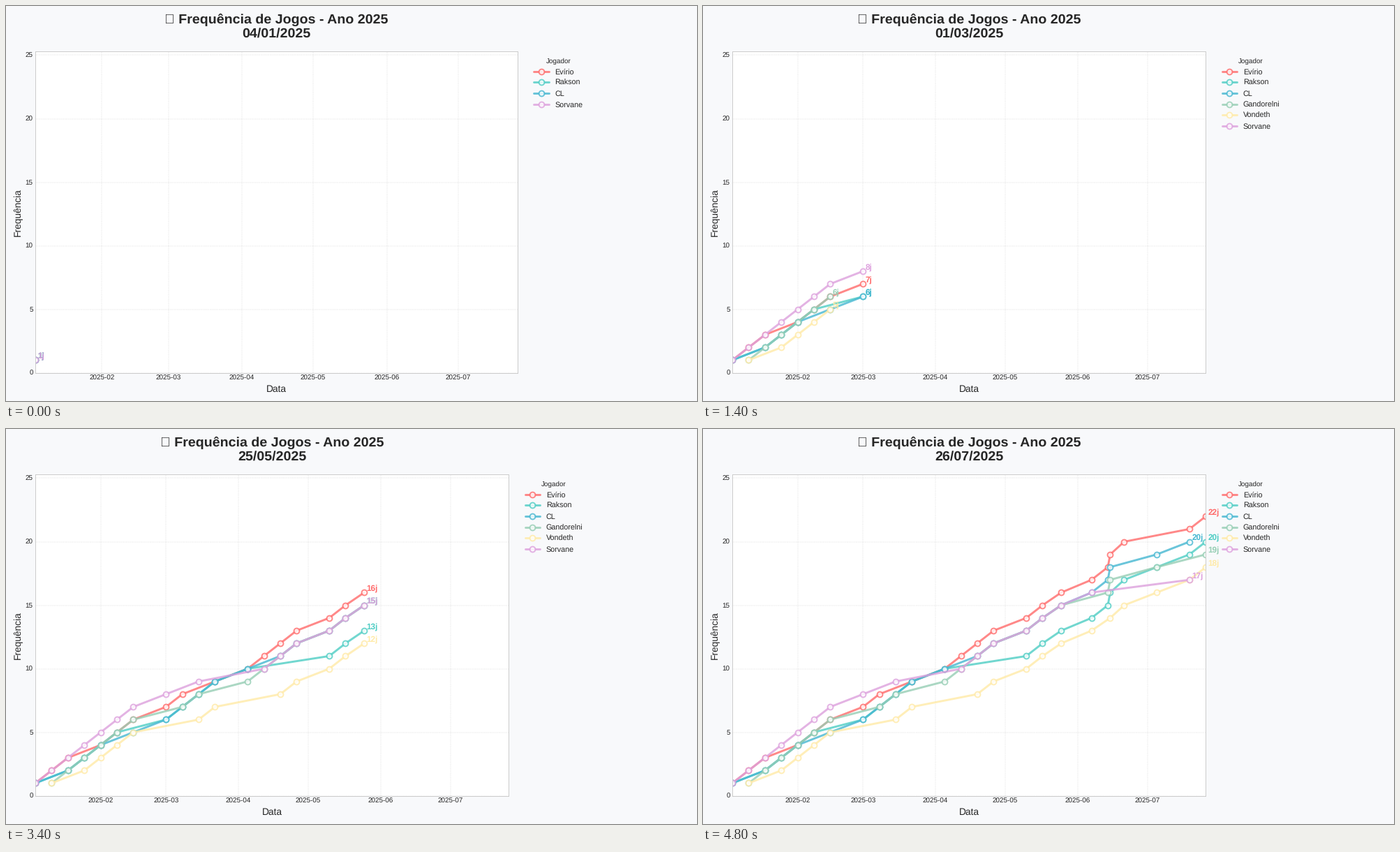
A matplotlib script for the animation above (5 s loop, 990 px wide and 566 px high).

```python
import matplotlib.pyplot as plt
import matplotlib.dates as mdates
import numpy as np
from matplotlib.animation import FuncAnimation

plt.style.use("seaborn-v0_8-whitegrid")
plt.rcParams.update({"font.family": "Liberation Sans", "text.hinting": "none"})

# Match days of 2025, grouped by month
SCHEDULE = {
    1: (4, 11, 18, 25),
    2: (1, 8, 15),
    3: (1, 8, 15, 22),
    4: (5, 12, 19, 26),
    5: (10, 17, 25),
    6: (7, 14, 15, 21),
    7: (5, 19, 26),
}
DATES = [np.datetime64(f"2025-{month:02d}-{day:02d}")
         for month, days in SCHEDULE.items() for day in days]
X = mdates.date2num(DATES)

# name, colour, indices of the match days the player missed
PLAYERS = [
    ("Evírio", "#FF6B6B", {3, 9, 22}),
    ("Rakson", "#4ECDC4", {1, 6, 12, 13, 14}),
    ("CL", "#45B7D1", {1, 5, 12, 21, 24}),
    ("Gandorelni", "#96CEB4", {0, 7, 10, 18, 21, 23}),
    ("Vondeth", "#FFEAA7", {0, 2, 7, 8, 11, 12, 19}),
    ("Sorvane", "#DDA0DD", {8, 10, 11, 19, 20, 21, 22, 24}),
]
TOP = 22 * 1.15

fig, ax = plt.subplots(figsize=(13.993, 8), dpi=70.75)
fig.set_facecolor("#F8F9FB")


def draw_player(name, color, missed, last):
    played = [i for i in range(last + 1) if i not in missed]
    if not played:
        return
    total = len(played)
    ax.plot(X[played], range(1, total + 1), color=color, label=name,
            lw=3, alpha=0.8, marker="o", ms=8, mfc="white", mec=color, mew=2)
    ax.text(X[played[-1]] + 1, total + 0.1, f"{total}j",
            color=color, fontsize=12, fontweight="bold")


def update(frame):
    ax.clear()
    for name, color, missed in PLAYERS:
        draw_player(name, color, missed, frame)

    ax.set_xlim(X[0], X[-1])
    ax.set_ylim(0, TOP)
    ax.xaxis.set_major_locator(mdates.MonthLocator())
    ax.xaxis.set_major_formatter(mdates.DateFormatter("%Y-%m"))
    ax.grid(True, linestyle="--", linewidth=0.5, alpha=0.7)

    year, month, day = str(DATES[frame]).split("-")
    ax.set_title(f"\U0001F4CA Frequência de Jogos - Ano 2025\n{day}/{month}/{year}",
                 fontsize=20, fontweight="bold", pad=20)
    ax.set_xlabel("Data", fontsize=14)
    ax.set_ylabel("Frequência", fontsize=14)
    ax.legend(title="Jogador", bbox_to_anchor=(1.02, 1), loc="upper left", fontsize=11)

    # The legend offset depends on the axes width, so let the layout settle
    for _ in range(2):
        fig.tight_layout(rect=(0, 0, 0.85, 1))
    return ax.get_children()


anim = FuncAnimation(fig, update, frames=len(DATES), interval=200,
                     repeat=True, repeat_delay=0, blit=False)
plt.show()
```
